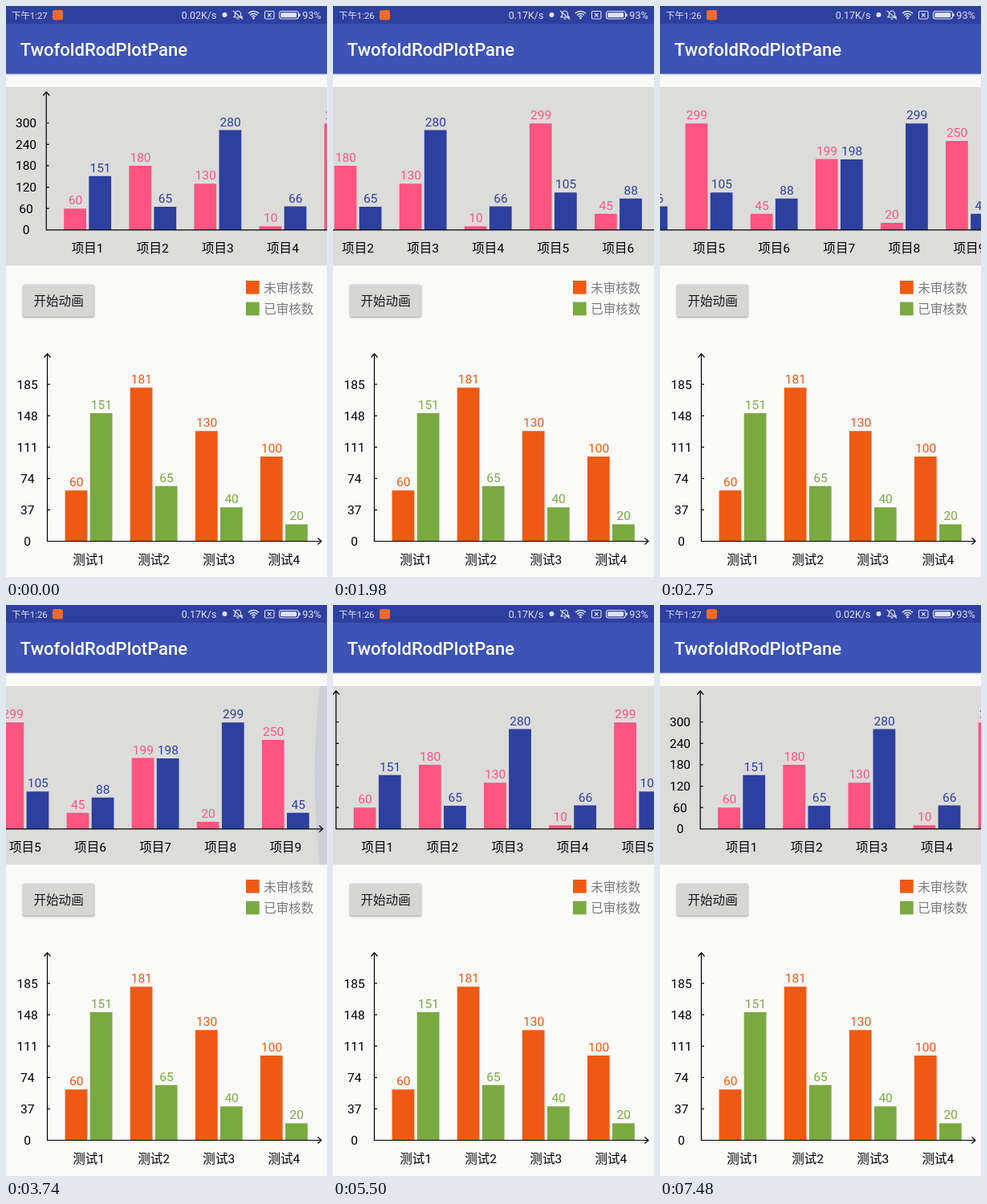
These frames come from a looping animation (400x711 px, 8000 ms). An HTML page with a canvas:

```html
<!DOCTYPE html>
<html lang="zh">
<head>
<meta charset="utf-8">
<style>
html, body { margin: 0; width: 100%; height: 100%; overflow: hidden; background: #fafaf9; }
canvas { display: block; width: 400px; height: 711px; }
</style>
</head>
<body>
<canvas id="stage" width="400" height="711"></canvas>
<script>
const ctx = document.getElementById('stage').getContext('2d');
const LOOP = 8000, STEP = 110;
const FAMILY = 'Roboto, "Noto Sans CJK SC", "Noto Sans CJK", sans-serif';
const DP = 400 / 360;
const TEXT_SIZE = 14 * DP, LINE = 1.1 * DP;
const BAR = 25 * DP, PAIR = 28 * DP, PITCH = 73 * DP;
const PANEL = { y: 91 * DP, h: 200 * DP };

// [time, horizontal scroll]
const SCROLL = [[0, 0], [1430, 0], [1540, 13.4], [2310, 259.7], [3080, 402.2],
  [4400, 402.2], [4950, 332.8], [5500, 46.4], [5720, 0], [8000, 0]];

const topChart = {
  axisX: 50.2, axisTop: 107, base: 278.8, axisEnd: 797, labelX: 25, nameY: 307,
  firstBar: 72.2, unit: 0.4435, tick: 60, ticks: 5, name: '项目',
  colors: ['#ff5580', '#2d409f'],
  rows: [[60, 151], [180, 65], [130, 280], [10, 66], [299, 105],
    [45, 88], [199, 198], [20, 299], [250, 45]]
};
const bottomChart = {
  axisX: 51.5, axisTop: 433, base: 666.5, axisEnd: 393, labelX: 26.7, nameY: 695,
  firstBar: 73.6, unit: 1.056, tick: 37, ticks: 5, name: '测试',
  colors: ['#ee5a13', '#7aa942'],
  rows: [[60, 151], [181, 65], [130, 40], [100, 20]]
};

function rect(x, y, w, h, color, radius = 0) {
  ctx.fillStyle = color;
  ctx.beginPath();
  ctx.roundRect(x, y, w, h, radius);
  ctx.fill();
}

function raised(blur, offset, ...shape) {
  ctx.save();
  ctx.shadowColor = 'rgba(0,0,0,.4)';
  ctx.shadowBlur = blur;
  ctx.shadowOffsetY = offset;
  rect(...shape);
  ctx.restore();
}

function text(str, x, y, color, align = 'center', size = TEXT_SIZE, weight = 400) {
  ctx.font = `${weight} ${size}px ${FAMILY}`;
  ctx.textAlign = align;
  ctx.fillStyle = color;
  ctx.fillText(str, x, y);
}

function line(color, width, ...points) {
  ctx.strokeStyle = color;
  ctx.lineWidth = width;
  ctx.beginPath();
  points.forEach(([x, y]) => ctx.lineTo(x, y));
  ctx.stroke();
}

// Monotone cubic interpolation through [time, value] points.
function follow(points, t) {
  const i = Math.max(0, points.findIndex(p => p[0] > t) - 1);
  const secant = k => k < 0 || k >= points.length - 1 ? 0 :
    (points[k + 1][1] - points[k][1]) / (points[k + 1][0] - points[k][0]);
  const slope = k => {
    const a = secant(k - 1), b = secant(k);
    return a * b > 0 ? 2 * a * b / (a + b) : 0;
  };
  const [t0, v0] = points[i], [t1, v1] = points[i + 1];
  const d = t1 - t0, u = (t - t0) / d, w = 1 - u;
  return v0 * (1 + 2 * u) * w * w + v1 * u * u * (3 - 2 * u) +
    d * u * w * (slope(i) * w - slope(i + 1) * u);
}

function pulse(t, from, to) {
  return t > from && t < to ? Math.sin(Math.PI * (t - from) / (to - from)) : 0;
}

function drawChart(c) {
  c.rows.forEach((row, i) => {
    const left = c.firstBar + i * PITCH;
    row.forEach((value, k) => {
      const x = left + k * PAIR, h = value * c.unit;
      rect(x, c.base - h, BAR, h, c.colors[k]);
      text(value, x + BAR / 2 + 0.3, c.base - h - 5, c.colors[k]);
    });
    text(c.name + (i + 1), left + (PAIR + BAR) / 2, c.nameY, '#000');
  });
  const { axisX: x, axisTop: top, base, axisEnd: end } = c;
  line('#000', LINE, [x, top], [x, base], [end, base]);
  line('#000', LINE, [x - 4, top + 4.5], [x, top], [x + 4, top + 4.5]);
  line('#000', LINE, [end - 4.5, base - 4], [end, base], [end - 4.5, base + 4]);
  for (let i = 0; i <= c.ticks; i++) {
    const y = base - i * c.tick * c.unit;
    if (i) line('#000', LINE, [x, y], [x + 3.5, y]);
    text(i * c.tick, c.labelX, y + 5.5, '#000');
  }
}

function drawGlow(amount, side) {
  if (!amount) return;
  const radius = 951, reach = 15.5 * amount;
  ctx.globalAlpha = 0.1 * amount;
  ctx.fillStyle = '#3f51b5';
  ctx.beginPath();
  ctx.arc(side > 0 ? 400 - reach + radius : reach - radius, 212, radius, 0, Math.PI * 2);
  ctx.fill();
  ctx.globalAlpha = 1;
}

function drawStatus(t) {
  const ink = '#dfe2f2', late = t < 220 || t >= 7040;
  rect(0, 0, 400, 20 * DP, '#2e409f');
  text(late ? '下午1:27' : '下午1:26', 7, 15.7, ink, 'left', 11.4);
  rect(58, 5, 13, 12.5, '#f26a2c', 2.5);
  text(late ? '0.02K/s' : '0.17K/s', 262.3, 15.7, ink, 'right', 12.4);
  rect(269.5, 8, 6, 6, ink, 3);

  // muted bell
  ctx.lineJoin = 'round';
  line(ink, 1.1, [283.5, 14], [285.5, 12], [285.5, 9], [287, 6.7], [289, 6],
    [291, 6.7], [292.5, 9], [292.5, 12], [294.5, 14], [283.5, 14]);
  line(ink, 1.1, [287.5, 16], [290.5, 16]);
  line(ink, 1.1, [283, 6], [295, 16.5]);
  ctx.lineJoin = 'miter';

  // wireless arcs
  ctx.strokeStyle = ink;
  ctx.lineWidth = 1.5;
  for (const r of [3, 6, 9]) {
    ctx.beginPath();
    ctx.arc(308.5, 15.5, r, -Math.PI * 0.76, -Math.PI * 0.24);
    ctx.stroke();
  }
  rect(307.3, 14, 2.4, 2.4, ink, 1.2);

  // missing card
  ctx.lineWidth = 1.1;
  ctx.beginPath();
  ctx.roundRect(322.5, 6.5, 11.5, 9.5, 1.5);
  ctx.stroke();
  line(ink, 1.1, [326, 9], [330.5, 13.5]);
  line(ink, 1.1, [330.5, 9], [326, 13.5]);

  // battery
  ctx.beginPath();
  ctx.roundRect(340.5, 6.5, 24, 9.5, 3);
  ctx.stroke();
  rect(342.2, 8.2, 20, 6.1, ink, 1.5);
  rect(365, 9.5, 1.7, 3.5, ink);
  text('93%', 369.3, 15.7, ink, 'left', 12.6);
}

function drawHeader(t) {
  raised(3.5, 1, 0, 20, 400, 76 * DP - 20, '#3d53b6');
  drawStatus(t);
  text('TwofoldRodPlotPane', 17.8, 62, '#fff', 'left', 22, 500);
}

function drawControls() {
  raised(2.5, 1, 21, 346.7, 88.9, 40, '#d6d6d5', 2);
  text('开始动画', 65.6, 372.8, '#1a1a1a');
  ['未审核数', '已审核数'].forEach((label, i) => {
    const y = 342 + i * 24 * DP, size = 15 * DP;
    rect(299, y, size, size, bottomChart.colors[i]);
    text(label, 321.2, y + 14.6, '#7c7c7c', 'left');
  });
}

function draw(t) {
  rect(0, 0, 400, 711, '#fafaf9');
  drawHeader(t);

  ctx.save();
  ctx.beginPath();
  ctx.rect(0, PANEL.y, 400, PANEL.h);
  ctx.clip();
  rect(0, 100, 400, 225, '#dcdcdb');
  ctx.save();
  ctx.translate(-follow(SCROLL, t), 0);
  drawChart(topChart);
  ctx.restore();
  drawGlow(pulse(t, 3190, 4180), 1);
  drawGlow(pulse(t, 5720, 6490), -1);
  ctx.restore();

  drawControls();
  drawChart(bottomChart);
}

function tick() {
  const t = performance.now() % LOOP;
  draw(Math.floor(t / STEP) * STEP);
  requestAnimationFrame(tick);
}
tick();
</script>
</body>
</html>
```
